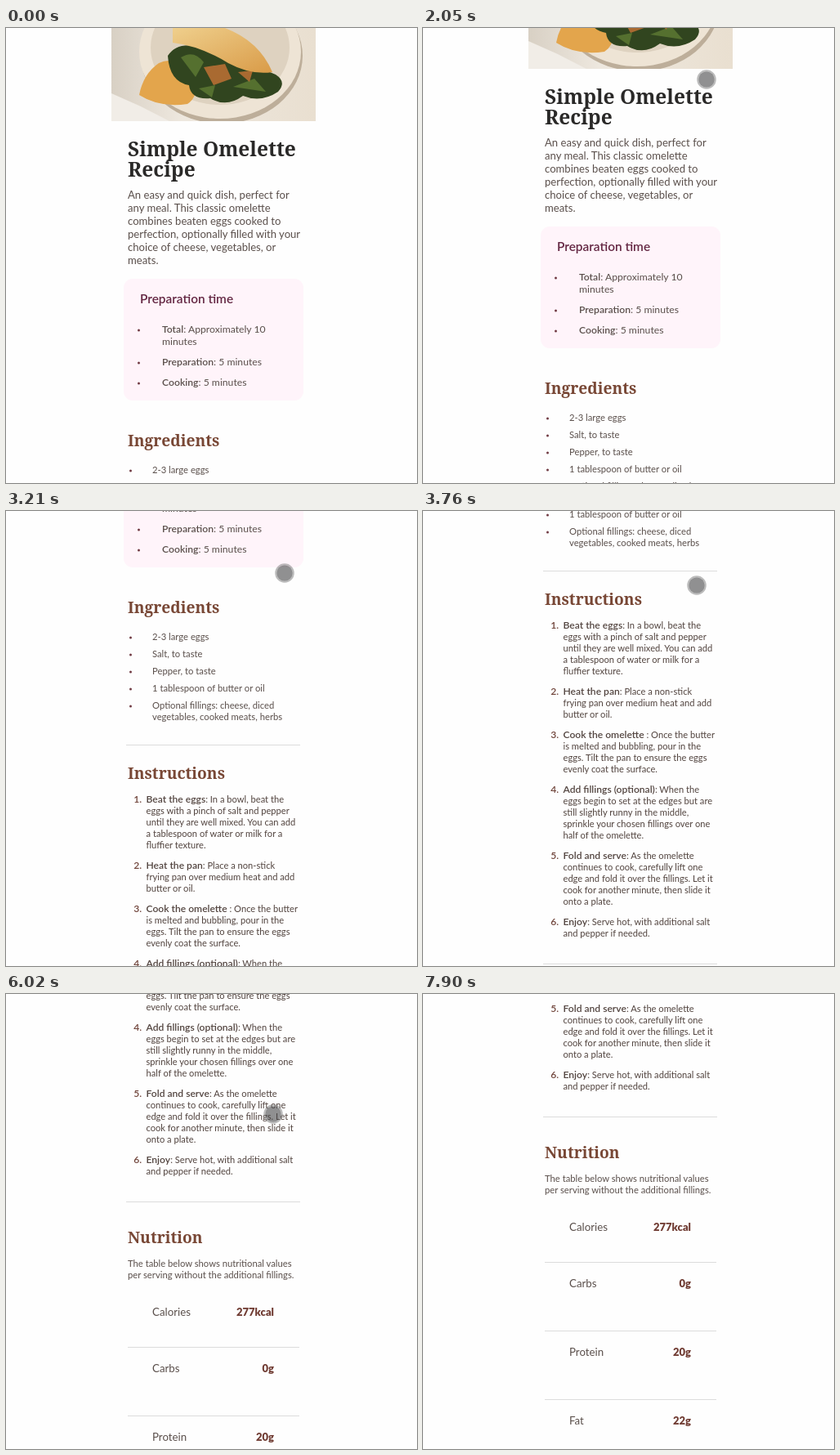
Animation, 503 px wide and 557 px high, one loop 8430 ms. Source, as an HTML page:

```html
<!DOCTYPE html>
<html lang="en">
<head>
<meta charset="utf-8">
<title>Recipe scroll</title>
<style>
  html, body { margin: 0; width: 503px; height: 557px; overflow: hidden; background: #fefefe; }
  svg { display: block; }
  text { font-family: Lato, sans-serif; fill: #5a4f4b; }
  .title, .head { font-family: "Noto Serif", serif; font-weight: 600; }
  .title { font-size: 24.5px; fill: #2a2928; }
  .head { font-size: 19.2px; fill: #784735; }
  .intro { font-size: 13.1px; }
  .card { font-size: 12.2px; }
  .cardhead { font-size: 15.4px; font-weight: 600; fill: #632642; }
  .item { font-size: 11.25px; }
  .step { font-size: 11.15px; fill: #51433e; }
  .step b, .strong { font-weight: 600; }
  .step .strong { font-size: 12.1px; }
  .num { font-size: 12.1px; font-weight: 600; text-anchor: end; fill: #6e4238; }
  .row { font-size: 13.3px; }
  .value { font-size: 13px; font-weight: 900; text-anchor: end; fill: #703c33; }
  .rule { stroke: #dcdcdc; }
  .dot { fill: #713b44; }
</style>
</head>
<body>
<svg width="503" height="557" viewBox="0 0 503 557">
  <defs>
    <clipPath id="photo"><rect x="129" width="250" height="114"/></clipPath>
    <linearGradient id="marble"><stop stop-color="#d8d0c4"/><stop offset=".35" stop-color="#eee8df"/><stop offset="1" stop-color="#e9dfd0"/></linearGradient>
    <linearGradient id="egg" x2="1" y2="1"><stop stop-color="#efcf8c"/><stop offset="1" stop-color="#d99b48"/></linearGradient>
  </defs>
  <g id="page">
    <g clip-path="url(#photo)">
      <rect x="129" width="250" height="114" fill="url(#marble)"/>
      <path d="M129 80L165 96L200 114H129Z" fill="#f1ede7"/>
      <ellipse cx="264" cy="34" rx="99" ry="83" fill="#bdae9a"/>
      <ellipse cx="262" cy="29" rx="99" ry="82" fill="#eee4d5"/>
      <ellipse cx="262" cy="24" rx="85" ry="70" fill="#ded2c0"/>
      <path d="M163 82Q168 56 187 43Q210 32 232 62Q236 84 222 93Q188 98 163 82Z" fill="#e3a54c"/>
      <path d="M198 34Q208 18 232 22L290 40L330 57Q344 66 333 78Q312 92 290 83Q270 98 250 86Q226 88 224 70Q200 66 198 34Z" fill="#31451f"/>
      <path d="M214 36Q230 26 242 42L232 60ZM278 72L304 62L318 78ZM236 74L256 70L252 85Z" fill="#55702f"/>
      <path d="M242 48L268 44L276 62L254 70ZM284 54L302 52L298 66Z" fill="#a96a31"/>
      <path d="M204 0H268Q310 16 326 54Q300 58 272 43Q238 22 204 18Z" fill="url(#egg)"/>
    </g>
    <rect x="144" y="307" width="220" height="149" rx="11" fill="#fff4fa"/>
  </g>
  <g id="pointer">
    <circle r="10.5" fill="none" stroke="#777" stroke-opacity=".5" stroke-width="2.5"/>
    <circle r="9.5" fill="#464648" fill-opacity=".6"/>
  </g>
</svg>
<script>
const page = document.getElementById('page');
const pointer = document.getElementById('pointer');
const LOOP = 8430, START = 280, TICK = 68;

let markup = '';
const text = (x, y, style, lines, leading = 0) => [].concat(lines).forEach((line, i) =>
  markup += `<text x="${x}" y="${y + i * leading}" class="${style}">${line}</text>`);
const rule = (y, x1 = 149, x2 = 359) => markup += `<path class="rule" d="M${x1} ${y + .5}H${x2}"/>`;
const dot = (x, y) => markup += `<circle class="dot" cx="${x}" cy="${y}" r="1.5"/>`;
const strong = s => `<tspan class="strong">${s}</tspan>`;

text(149, 157, 'title', ['Simple Omelette', 'Recipe'], 25);
text(149, 209, 'intro', [
  'An easy and quick dish, perfect for', 'any meal. This classic omelette',
  'combines beaten eggs cooked to', 'perfection, optionally filled with your',
  'choice of cheese, vegetables, or', 'meats.'], 16);

text(164, 337, 'cardhead', 'Preparation time');
text(191, 373, 'card', [strong('Total') + ': Approximately 10', 'minutes'], 15);
text(191, 413, 'card', [strong('Preparation') + ': 5 minutes', strong('Cooking') + ': 5 minutes'], 25);
[370, 410, 435].forEach(y => dot(162.5, y));

text(149, 512, 'head', 'Ingredients');
text(179, 545, 'item', ['2-3 large eggs', 'Salt, to taste', 'Pepper, to taste',
  '1 tablespoon of butter or oil', 'Optional fillings: cheese, diced'], 21);
text(179, 643, 'item', 'vegetables, cooked meats, herbs');
for (let i = 0; i < 5; i++) dot(152.5, 542 + i * 21);
rule(673, 147, 360);

text(149, 715, 'head', 'Instructions');
const steps = [
  ['Beat the eggs', ': In a bowl, beat the', 'eggs with a pinch of salt and pepper',
    'until they are well mixed. You can add', 'a tablespoon of water or milk for a', 'fluffier texture.'],
  ['Heat the pan', ': Place a non-stick', 'frying pan over medium heat and add', 'butter or oil.'],
  ['Cook the omelette', ' : Once the butter', 'is melted and bubbling, pour in the',
    'eggs. Tilt the pan to ensure the eggs', 'evenly coat the surface.'],
  ['Add fillings (optional)', ': When the', 'eggs begin to set at the edges but are',
    'still slightly runny in the middle,', 'sprinkle your chosen fillings over one', 'half of the omelette.'],
  ['Fold and serve', ': As the omelette', 'continues to cook, carefully lift one',
    'edge and fold it over the fillings. Let it', 'cook for another minute, then slide it', 'onto a plate.'],
  ['Enjoy', ': Serve hot, with additional salt', 'and pepper if needed.']
];
let y = 744;
steps.forEach(([name, first, ...rest], i) => {
  text(166, y, 'num', `${i + 1}.`);
  text(171.5, y, 'step', [strong(name) + first, ...rest], 14);
  y += 25 + rest.length * 14;
});
rule(1154, 147, 360);

text(149, 1205, 'head', 'Nutrition');
text(149, 1234, 'item', ['The table below shows nutritional values',
  'per serving without the additional fillings.'], 14);
[['Calories', '277kcal', 1294], ['Carbs', '0g', 1363], ['Protein', '20g', 1447], ['Fat', '22g', 1531]]
  .forEach(([name, amount, base]) => {
    text(179, base, 'row', name);
    text(328, base, 'value', amount);
  });
[1332, 1416, 1500].forEach(at => rule(at));
page.insertAdjacentHTML('beforeend', markup);

// Each key is [time, ...values].
const scrollKeys = [[1912, 0], [1980, 24], [2048, 64], [3204, 387], [3748, 600], [4200, 600], [4632, 700],
  [4972, 700], [5210, 800], [5380, 800], [5850, 900], [6128, 900], [6700, 1004]];
const pointerKeys = [[280, 461, 536], [480, 395, 380], [700, 325, 205], [850, 328, 140], [1100, 366, 96],
  [1500, 352, 72], [1780, 348, 64], [2048, 347, 63], [3204, 341, 76], [3748, 335, 91], [4040, 333, 106],
  [4632, 332, 109], [4972, 332, 109], [5992, 327, 147], [6128, 327, 147], [7000, 318, 202],
  [7300, 350, 270], [7600, 440, 447], [7720, 465, 488], [7830, 485, 545]];

function sample(keys, t) {
  const next = keys.findIndex(k => k[0] > t);
  if (next < 0) return keys[keys.length - 1].slice(1);
  if (next === 0) return keys[0].slice(1);
  const a = keys[next - 1], b = keys[next], u = (t - a[0]) / (b[0] - a[0]);
  return a.slice(1).map((v, i) => v + (b[i + 1] - v) * u);
}

function draw(now) {
  const t = now % LOOP;
  const held = t < START ? 0 : START + TICK * Math.floor((t - START) / TICK);
  page.setAttribute('transform', `translate(0 ${-Math.round(sample(scrollKeys, held)[0])})`);
  pointer.setAttribute('transform', `translate(${sample(pointerKeys, held)})`);
  pointer.setAttribute('visibility', held >= START && held < 7890 ? 'visible' : 'hidden');
  requestAnimationFrame(draw);
}
requestAnimationFrame(draw);
</script>
</body>
</html>
```
